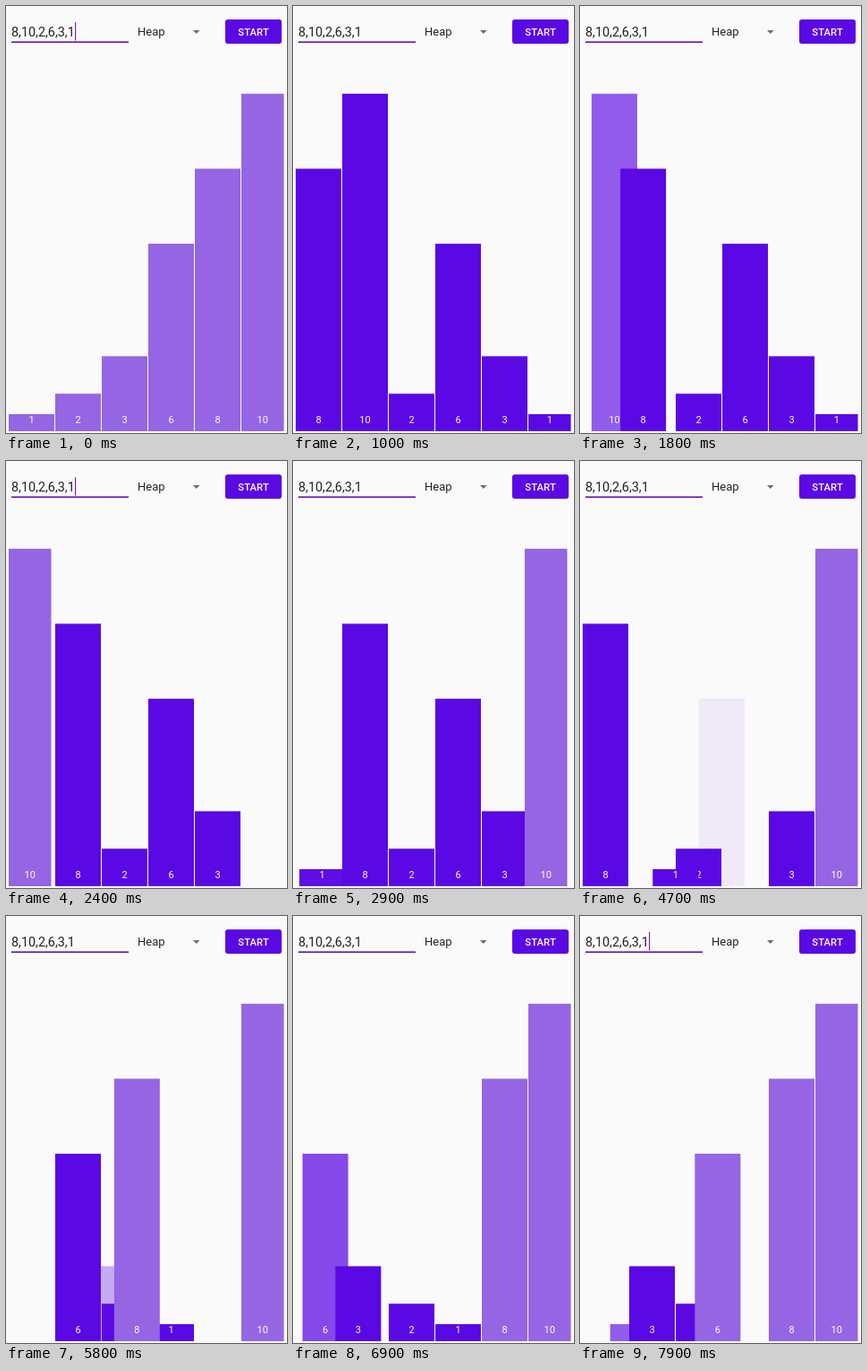
Write an HTML page that moves like this. It is 314 px wide and 476 px high and loops after 8 s.

```html
<!DOCTYPE html>
<html lang="en">
<head>
<meta charset="utf-8">
<title>Heap sort</title>
<style>
  html, body { margin: 0; width: 100%; height: 100%; overflow: hidden; background: #fafafa; }
  svg { display: block; width: 314px; height: 476px; font-family: Roboto, sans-serif; }
  .label { font-size: 11px; fill: #fff; text-anchor: middle; }
</style>
</head>
<body>
<svg viewBox="0 0 314 476">
  <rect width="314" height="476" fill="#fafafa"/>
  <text x="6" y="34" font-size="14.4" fill="#222">8,10,2,6,3,1</text>
  <rect x="6" y="39.4" width="131" height="1.7" fill="#6414b8"/>
  <rect id="cursor" x="77" y="18" width="1.2" height="20.5" fill="#8a1fa8"/>
  <text x="147" y="33" font-size="13" fill="#222">Heap</text>
  <path d="M209 27h7.6l-3.8 4z" fill="#6f6f6f"/>
  <rect x="245" y="15.6" width="63" height="27" rx="3" fill="#000" opacity=".16"/>
  <rect x="245" y="15" width="63" height="27" rx="3" fill="#5a08e4"/>
  <text x="276.6" y="33" font-size="11.2" font-weight="500" fill="#fff" text-anchor="middle" letter-spacing=".15">START</text>
  <circle id="tap" cx="293.5" cy="40" r="9.5" fill="#ddd" opacity=".4"/>
  <g id="bars"></g>
</svg>
<script>
const LOOP = 8000, MOVE = 400, PERIOD = 1017, RESET = 510, FIRST_SWAP = 1516, LEAD = 185;
const BOTTOM = 474, UNIT = 41.8, DARK = '#5a08e4', LIGHT = '#9565e4';
const input = [8, 10, 2, 6, 3, 1];
const last = input.length - 1;
const $ = id => document.getElementById(id);

// Each step: the order it leads to, the values already settled, and its timing.
function heapSortSteps(values) {
  const a = [...values], settled = [], steps = [];
  const record = (start, lead) => steps.push({ order: [...a], settled: [...settled], start, lead });
  const swap = (i, j) => {
    [a[i], a[j]] = [a[j], a[i]];
    record(FIRST_SWAP + (steps.length - 1) * PERIOD, LEAD);
  };
  const sift = (i, n) => {
    let top = i;
    for (const c of [2 * i + 1, 2 * i + 2]) if (c < n && a[c] > a[top]) top = c;
    if (top !== i) { swap(i, top); sift(top, n); }
  };
  record(RESET, 0);
  for (let i = (a.length >> 1) - 1; i >= 0; i--) sift(i, a.length);
  for (let n = last; n > 0; n--) {
    settled.push(a[0]);
    swap(0, n);
    sift(0, n);
  }
  return steps;
}

const sorted = [...input].sort((x, y) => x - y);
const steps = [{ order: sorted, settled: sorted, start: -MOVE, lead: 0 }, ...heapSortSteps(input)];

function add(parent, tag, attrs) {
  const el = document.createElementNS('http://www.w3.org/2000/svg', tag);
  for (const key in attrs) el.setAttribute(key, attrs[key]);
  return parent.appendChild(el);
}

const bars = input.map(value => {
  const group = add($('bars'), 'g', {});
  const height = Math.max(19, (value - 1) * UNIT);
  const rect = add(group, 'rect', { y: BOTTOM - height, height });
  const label = add(group, 'text', { y: 465, class: 'label' });
  label.textContent = value;
  return { value, group, rect, label };
});

const slotX = i => 3 + 52 * i;
const slotWidth = i => i === last ? 47.5 : 51;

function drawBars(t) {
  const k = steps.findLastIndex(s => t >= s.start - s.lead);
  const { order, settled, start } = steps[k];
  const before = steps[Math.max(0, k - 1)].order;
  const linear = Math.min(1, Math.max(0, (t - start) / MOVE));
  const p = (1 - Math.cos(Math.PI * linear)) / 2;

  const placed = bars.map(bar => {
    const to = order.indexOf(bar.value), from = before.indexOf(bar.value);
    const x = slotX(from) + (slotX(to) - slotX(from)) * p;
    const width = slotWidth(to);
    bar.rect.setAttribute('x', x);
    bar.rect.setAttribute('width', width);
    bar.rect.setAttribute('fill', settled.includes(bar.value) ? LIGHT : DARK);
    bar.label.setAttribute('x', x + width / 2);
    // Bars moving left fade in behind the rest; bars moving right pass in front.
    bar.group.setAttribute('opacity', to < from ? p * p : 1);
    return { bar, depth: Math.sign(to - from) };
  });
  placed.sort((m, n) => m.depth - n.depth).forEach(({ bar }) => $('bars').append(bar.group));
}

function cursorVisible(t) {
  return t < 580 || t >= 7700 || (t - 580) % 1020 >= 500;
}

function frame(now) {
  const t = (now - origin) % LOOP;
  drawBars(t);
  $('cursor').style.visibility = cursorVisible(t) ? 'visible' : 'hidden';
  $('tap').style.visibility = t >= 300 && t < 400 ? 'visible' : 'hidden';
  requestAnimationFrame(frame);
}

const origin = performance.now();
frame(origin);
</script>
</body>
</html>
```
